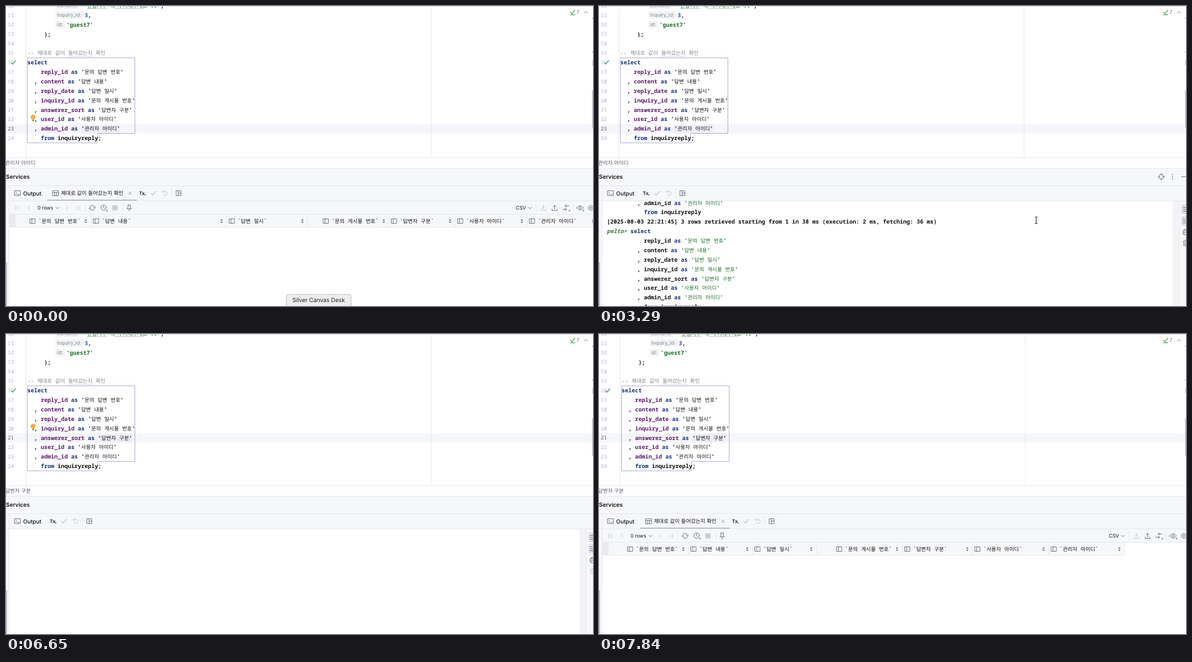
An HTML page that plays this animation: 1046 px wide and 535 px high, repeating every 8 s.

```html
<!DOCTYPE html>
<html lang="ko">
<head>
<meta charset="utf-8">
<style>
html, body { margin: 0; width: 100%; height: 100%; overflow: hidden; background: #fff; }
svg { display: block; width: 1046px; height: 535px; text-rendering: geometricPrecision; }
text { white-space: pre; font: 600 10px "Noto Sans Mono", "DejaVu Sans Mono", monospace; fill: #111; }
text.ui { font: 500 10px Inter, "Noto Sans CJK KR", sans-serif; fill: #111; }
text.small { font-size: 8.8px; font-weight: 400; }
text.hint { font-size: 9px; font-weight: 400; fill: #868a91; }
text.num { font-size: 9.2px; font-weight: 400; fill: #aeb3c2; }
text.num.on { fill: #555a68; }
text.note { font-weight: 400; fill: #858585; }
text.head { font-weight: 500; }
.h { font-family: "Noto Sans CJK KR", "Noto Sans CJK", sans-serif; font-size: 9.36px; font-weight: 500; }
.note .h, #crumb { font-weight: 400; }
.k { fill: #17307f; }
.editor .i { fill: #5c1a6c; }
.console .s, .g { fill: #1c6e2c; }
.prompt { fill: #2c7d37; font-style: italic; }
.line { fill: none; stroke: #6c707e; stroke-width: 1; stroke-linecap: round; stroke-linejoin: round; }
.off { stroke: #c3c6ce; }
.rule { fill: #e6e8ed; }
</style>
</head>
<body>
<svg id="stage" viewBox="0 0 1046 535" xmlns="http://www.w3.org/2000/svg"></svg>
<script>
const LOOP = 8000, STEP = 70, PITCH = 16.88;
const lineTop = n => 92.4 + (n - 16) * PITCH;
const range = (a, b) => Array.from({ length: b - a + 1 }, (_, i) => a + i);

const hangul = s => s.replace(/[가-힣]+/g, m => `<tspan class="h">${m}</tspan>`);
const text = (x, y, s, cls = '', extra = '') => `<text x="${x}" y="${y}" class="${cls}" ${extra}>${hangul(s)}</text>`;
const rect = (x, y, w, h, fill, extra = '') => `<rect x="${x}" y="${y}" width="${w}" height="${h}" fill="${fill}" ${extra}/>`;
const rule = (x, y, w, h) => `<rect class="rule" x="${x}" y="${y}" width="${w}" height="${h}"/>`;
const line = (d, cls = '', extra = '') => `<path class="line ${cls}" d="${d}" ${extra}/>`;
const group = (id, body, extra = '') => `<g id="${id}" ${extra}>${body}</g>`;
const code = (x, y, s) => text(x, y, s.replace(/('[^']*')|\b(select|as|from)\b|\b(\w+_\w+|content)\b/g,
  (m, str, key) => `<tspan class="${str ? 's' : key ? 'k' : 'i'}">${m}</tspan>`));

const labels = ['문의 답변 번호', '답변 내용', '답변 일시', '문의 게시물 번호', '답변자 구분', '사용자 아이디', '관리자 아이디'];
const names = ['reply_id', 'content', 'reply_date', 'inquiry_id', 'answerer_sort', 'user_id', 'admin_id'];
const fields = names.map((n, i) => `${i ? '  , ' : '    '}${n} as '${labels[i]}'`);

function editor() {
  const base = n => lineTop(n) + 11.8;
  const hint = (n, w, s) => rect(88, lineTop(n) + 1.5, w, 13, '#f2f3f5', 'rx="2.5"') + text(91, base(n) - .9, s, 'ui hint');
  return rect(0, 0, 1046, 270, '#fff')
    + group('current', rect(0, 0, 1046, PITCH, '#f5f6f9'))
    + group('body',
      rule(35, 0, 1, 270) + rule(757, 0, 1, 270)
      + group('token', '')
      + group('selection', rect(38, lineTop(16), 1010, PITCH * 8, '#c9c8fd')
        + rect(38, lineTop(24), 125.5, PITCH, '#c9c8fd') + rect(757, lineTop(16), 1, PITCH * 8, '#dcdcf6'))
      + '<path d="M38 92.5H229.7V227.300H163V244H38Z" fill="none" stroke="#aaa6d2" stroke-width="1"/>'
      + rule(47.5, lineTop(24), 1, PITCH - 1)
      + hint(10, 42, 'content:') + text(139, base(10), "'운동기구 꼭 추가해주세요 !!'<tspan fill=\"#111\">,</tspan>", 'g')
      + line('M145 4.5h34M194 4.5h51', '', 'style="stroke:#9db8a0;stroke-dasharray:1 1.5"')
      + hint(11, 50, 'inquiry_id:') + text(140, base(11), '<tspan fill="#1750c8">3</tspan>,')
      + hint(12, 17, 'id:') + text(107.5, base(12), "'guest7'", 'g')
      + text(68, base(13), ');')
      + text(38, base(15), '-- 제대로 값이 들어갔는지 확인', 'note')
      + line('M111 90h43', '', 'style="stroke:#a9b3a9;stroke-width:.8;stroke-dasharray:1 1.5"')
      + code(38, base(16), 'select')
      + fields.map((f, i) => code(38, base(17 + i), f)).join('')
      + code(38, base(24), '    from inquiryreply;')
      + line('M9.5 101l2.5 2.8 5-6.3', '', 'style="stroke:#5a9e72;stroke-width:1.6"')
      + group('bulb', '<circle cx="48.3" cy="-1" r="4.5" fill="#f4af3d"/>' + rect(46.5, 3.6, 3.6, 2.4, '#777b85', 'rx="1"'))
      + group('caret', rect(224.4, lineTop(21) + 1, 1.4, 14, '#000')))
    + range(10, 24).map(n => text(3, base(n) - .2, String(n), 'num', `data-line="${n}"`)).join('')
    + line('M1006 11l2.5 2.8 5-6.3M1006 16l1.5-1 1.5 1 1.5-1 1.5 1 1.5-1', '', 'style="stroke:#5a9e62;stroke-width:1.3"')
    + text(1016.5, 14.4, '7', 'ui small', 'style="fill:#6c707e"') + line('M1030.5 12.5l3-3 3 3')
    + rect(1044.5, 150, 1.5, 67, '#b9bcc4') + rect(1044.5, 97, 1.5, 9, '#c9ccd2')
    + rect(1044.5, 20, 1.5, 4, '#c9ccd2') + rect(1044.5, 80, 1.5, 4, '#c9ccd2')
    + rect(0, 0, 1046, 1, '#d8dade');
}

const tableIcon = (x, y) => line(`M${x} ${y}h10v9h-10zM${x} ${y + 3}h10M${x + 3.3} ${y + 3}v6M${x + 6.6} ${y + 3}v6`);

function panel() {
  const tools = text(0, 337, 'Tx', 'ui', 'style="font-size:8.6px;font-weight:600"') + rect(10, 336, 1.6, 1.6, '#333')
    + line('M21 334l3 3 6-6.5', 'off', 'style="stroke-width:1.3"')
    + line('M42 331h5a3.2 3.2 0 0 1 0 6.5h-3M42 331l2.5-2.5M42 331l2.5 2.5', 'off')
    + rule(58, 326, 1, 16) + line('M66.5 329.5h8.5v8.5h-8.5zM70 329.5v8.5M70 333.5h5');
  return rect(0, 270, 1046, 1, '#e6e8ed') + rect(0, 271, 1046, 18, '#fff')
    + '<text id="crumb" class="ui" x="-1.5" y="282.6" style="font-size:9.36px;fill:#5a5d6b"></text>'
    + rect(0, 289, 1046, 246, '#f6f7f9') + rule(0, 289, 1046, 1) + rule(0, 320, 1046, 1)
    + text(0, 308.2, 'Services', 'ui', 'style="font-weight:600"')
    + group('actions', '<circle class="line" cx="1002" cy="304.5" r="4.5"/>'
      + line('M1002 299v3M1002 307v3M996.5 304.5h3M1004.5 304.5h3')
      + [300.5, 304.5, 308.5].map(y => `<circle cx="1022" cy="${y}" r=".9" fill="#6c707e"/>`).join('') + line('M1037.5 304.5h9'))
    + line('M15.5 329.5h10v8.5h-10zM17.5 332l2 1.8-2 1.8M21 336h2.5')
    + text(30.5, 337.5, 'Output', 'ui')
    + group('tab', group('tabHover', rect(73, 321, 160, 26, '#e4e6eb') + '<circle cx="220.5" cy="334" r="6" fill="#cfd2d9"/>')
      + rect(73, 345.5, 160, 2, '#a9adb8') + tableIcon(83.5, 329.5)
      + text(98, 337.3, '제대로 값이 들어갔는지 확인', 'ui') + line('M218.5 331.5l5 5M223.5 331.5l-5 5', '', 'style="stroke:#9a9eaa"'))
    + group('tools', tools)
    + rule(0, 347, 1046, 1) + rule(5, 320, 1, 215);
}

function columns(seps, id) {
  const end = Math.min(seps[6], 1046);
  return group(id, rect(6, 372, end - 6, 22, '#f6f7f9') + rect(6, 372, 11, 22, '#e9ebef')
    + rule(6, 371, 1040, 1) + rule(6, 394, end - 6, 1)
    + seps.map((sep, i) => {
      const x = i == 0 ? sep - 108.5 : i == 3 ? sep - 117 : seps[i - 1] + 4.5;
      return rule(sep, 372, 1, 22) + line(`M${x + .5} 379.5h9v8h-9zM${x + 3.5} 379.5v8`)
        + text(x + 15, 387.2, '`' + labels[i] + '`', 'head')
        + `<path d="M${sep - 11} 382.7l2.2-2.6 2.2 2.6zM${sep - 11} 384.7l2.2 2.6 2.2-2.6z" fill="#5f6370"/>`;
    }).join(''));
}

function grid() {
  const corner = (x, y) => `<path d="M${x} ${y}h-3l3-3z" fill="#6c707e"/>`;
  return rect(6, 372, 1040, 163, '#fff')
    + line('M17.5 356.5v7M24 356.5l-3.5 3.5 3.5 3.5M42.5 356.5l-3.5 3.5 3.5 3.5M107 356.5l3.5 3.5-3.5 3.5M125.5 356.5l3.5 3.5-3.5 3.5M131.5 356.5v7', 'off')
    + text(56, 363.2, '0 rows', 'ui small') + line('M89 358.8l2.7 2.7 2.7-2.7') + rule(141, 352, 1, 16)
    + line('M149.300 358.500a4.500 4.500 0 0 1 8.500 0M156 359l2 1.500 1.500-2M158 361.500a4.500 4.500 0 0 1-8.500 0M151.300 361l-2-1.500-1.500 2')
    + '<circle class="line" cx="174" cy="359.5" r="4.8"/>' + line('M174 356.5v3.3l2 1.3') + corner(181, 366)
    + rect(189.5, 355.5, 9, 9, '#c9ccd3', 'rx="1"') + rule(208, 352, 1, 16)
    + line('M217 355h5M217.5 355v4l-2 2.5h8l-2-2.5v-4M219.5 361.5v4')
    + text(908.5, 363.2, 'CSV', 'ui small') + line('M931 358.8l2.7 2.7 2.7-2.7') + rule(944, 352, 1, 16)
    + line('M957.5 355v6M955 358.8l2.5 2.5 2.5-2.5M953 362v2.5h9v-2.5', 'off')
    + line('M977.5 362v-6.5M975 358l2.5-2.5 2.5 2.5M973 362v2.5h9v-2.5')
    + line('M992 362.5h7M996.5 360.5l2.5 2-2.5 2.3M1003 356.5h-7M998.5 354.5l-2.5 2 2.5 2.3') + corner(1005, 366)
    + rule(1010, 352, 1, 16)
    + line('M1017 360q6-8 12 0q-6 8-12 0z') + '<circle class="line" cx="1023" cy="360" r="1.7"/>' + corner(1030, 366)
    + '<circle class="line" cx="1042" cy="360" r="4.3"/><circle class="line" cx="1042" cy="360" r="1.5"/>'
    + columns([151, 393, 537, 682, 800, 928, 1055], 'wide') + columns([159, 273, 387, 540, 665, 801, 936], 'narrow');
}

function consoleView() {
  const indent = ' '.repeat(7), y = i => 354.5 + i * PITCH;
  const log = [indent + fields[6], indent + '    from inquiryreply', '', '',
    ...fields.map(f => indent + f), indent + '    from inquiryreply'];
  const stamp = '[2025-08-03 22:21:45] 3 rows retrieved starting from 1 in 38 ms (execution: 2 ms, fetching: 36 ms)';
  return rect(6, 348, 1016, 187, '#fff') + rect(1022, 348, 12, 187, '#f2f3f5') + rule(1033, 348, 1, 187)
    + group('log', log.map((s, i) => code(14, y(i), s)).join('') + text(14, y(2), stamp)
      + text(14, y(3), '<tspan class="prompt">pelto&gt;</tspan> <tspan class="k">select</tspan>'), 'clip-path="url(#logClip)"')
    + [354, 374.5].map(t => rect(1037.5, t, 12, 17, '#dfe1e6', 'rx="3"')).join('')
    + line('M1041 359.5h6M1041 363h4M1041 366.5h6M1041 379.5h3M1041 383h4M1041 386.5h6')
    + line('M1042.5 401v-2.5h6M1041 406v-5h7M1042.5 404h5v4h-5z')
    + line('M1041 419.5h7M1042 419.5v8h6M1044.5 422v3.5M1044 417.5h3', '', 'id="trash"');
}

const stage = document.getElementById('stage');
stage.innerHTML = '<defs><clipPath id="logClip"><rect x="6" y="348" width="1016" height="187"/></clipPath></defs>'
  + group('editor', editor(), 'class="editor"') + panel()
  + group('grid', grid()) + group('console', consoleView(), 'class="console"')
  + rect(0, 457, 2, 78, '#c4c6cb')
  + group('tip', rect(499.5, 514.5, 115.5, 26, '#ededed', 'rx="4" stroke="#b9bbbb"')
    + text(557, 528.4, 'Silver Canvas Desk', 'ui', 'text-anchor="middle" style="font-size:10.3px;font-weight:400;fill:#222"'))
  + group('arrow', '<path d="M0 0v10.2l2.3-2.2 1.6 3.7 1.8-.8-1.6-3.6h3.2z" fill="#000" stroke="#fff" stroke-width=".7"/>')
  + group('beam', '<path d="M-2.5-6q2.5 0 2.5 1.5q0-1.5 2.5-1.5M0-5v10M-2.5 6q2.5 0 2.5-1.5q0 1.5 2.5 1.5" fill="none" stroke="#222" stroke-width="1.1"/>');

const $ = id => document.getElementById(id);
const show = (id, on) => $(id).setAttribute('display', on ? 'inline' : 'none');
const move = (id, x, y) => $(id).setAttribute('transform', `translate(${x} ${y})`);
const within = (t, a, b) => t >= a && t < b;

// Pointer path: time, x, y
const path = [[70, 557, 528], [840, 640, 240], [1680, 205, 346], [2030, 216, 336], [2450, 216, 336],
  [3080, 779, 382], [3290, 779, 382], [3990, 1042, 420], [4340, 1042, 420], [4900, 258, 186], [6580, 258, 186]];

function pointer(t) {
  const i = path.findIndex(p => p[0] > t);
  if (i < 1) return null;
  const [a, b] = [path[i - 1], path[i]];
  const u = (t - a[0]) / (b[0] - a[0]), e = u * u * (3 - 2 * u);
  return [a[1] + (b[1] - a[1]) * e, a[2] + (b[2] - a[2]) * e];
}

function draw(time) {
  const t = Math.floor(time % LOOP / STEP) * STEP;
  const row = t < 4900 ? 23 : 21;
  const rerun = t >= 7420;
  const tabOpen = t < 2520 || rerun;

  show('tip', t < 70);
  move('current', 0, lineTop(row));
  move('body', rerun ? 2.3 : 0, 0);
  $('token').innerHTML = row == 23
    ? rect(134, lineTop(23) + 1, 69.5, 15, '#ededf8')
    : rect(164, lineTop(21) + 1, 61, 15, '#ededf8');
  stage.querySelectorAll('[data-line]').forEach(n => n.classList.toggle('on', +n.dataset.line == row));
  show('selection', within(t, 6720, 7280));
  show('bulb', t < 420 || within(t, 1890, 3220) || within(t, 5880, 6720));
  move('bulb', 0, lineTop(row - 1) + 5.5);
  show('caret', within(t, 4900, 5530) || within(t, 6090, 6650));
  $('crumb').textContent = t < 5110 ? labels[6] : labels[4];

  show('actions', within(t, 1260, 4900));
  show('tab', tabOpen);
  show('tabHover', within(t, 1750, 2520));
  move('tools', tabOpen ? 237 : 78, 0);
  show('grid', tabOpen);
  show('console', !tabOpen);
  show('wide', !rerun);
  show('narrow', rerun);
  show('log', t < 4200);
  $('trash').classList.toggle('off', t >= 4200);

  const p = pointer(t);
  const overText = p && (p[1] < 270 || (!tabOpen && p[1] > 348 && p[0] < 1022));
  show('arrow', p && !overText);
  show('beam', overText);
  if (p) move(overText ? 'beam' : 'arrow', p[0], p[1]);
}

function tick() {
  draw(performance.now());
  requestAnimationFrame(tick);
}
tick();
</script>
</body>
</html>
```
